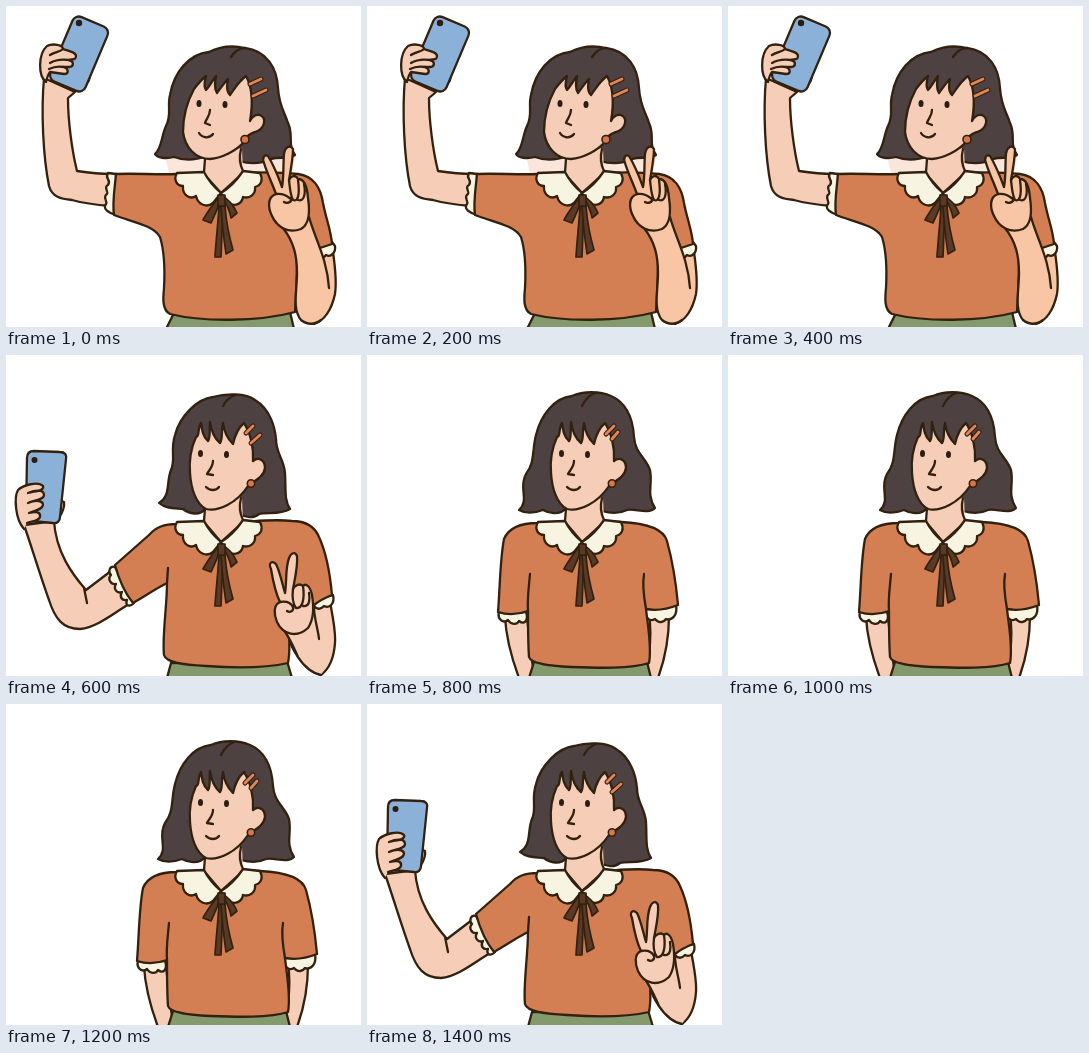
Animation, 355 px wide and 321 px high, one loop 1.6 s. Source, as an HTML page:

```html
<!DOCTYPE html>
<html lang="en">
<head>
<meta charset="utf-8">
<title>Selfie</title>
<style>
  html, body { margin: 0; width: 100%; height: 100%; overflow: hidden; background: #fff; }
  svg { display: block; width: 100vw; height: 100vh; }
  path, rect, circle { fill: none; stroke: #32210f; stroke-width: 2.3; stroke-linejoin: round; stroke-linecap: round; }
  .skin { fill: #f6cdb7; }
  .hand { fill: #f8c6a4; }
  .shirt { fill: #d37f53; }
  .cream { fill: #f7f4e2; }
  .hair { fill: #4e4142; }
  .skirt { fill: #849a6c; }
  .phone { fill: #8cb1d9; }
  .bow { fill: #5a3a26; stroke-width: 1.7; }
  .clip { stroke-width: 5; }
  .clip.in { stroke: #e38656; stroke-width: 2.8; }
  .dot { fill: #2b1d13; stroke: none; }
  .ring { fill: #d87749; stroke-width: 1.6; }
  .pale { fill: #fae6da; }
  .bare { stroke: none; }
</style>
</head>
<body>
<svg viewBox="0 0 355 321" preserveAspectRatio="none">
  <defs>
    <g id="collar">
      <path class="cream" d="M171 167C167 174 171 180 177 180C176 189 184 194 190 190C192 199 201 202 207 197L215 187L222 197C229 201 236 198 237 191C244 193 250 188 249 181C256 179 257 173 254 167L237 165C231 174 223 182 215 187C208 181 202 174 198 166Z"/>
      <path class="bow" d="M213 190C207 199 201 206 197 214L205 217C209 208 213 200 215 192Z"/>
      <path class="bow" d="M216 190C220 197 224 204 225 212L231 207C228 200 222 193 216 190Z"/>
      <path class="bow" d="M213 200C212 218 210 234 209 251L215 251L217 201Z"/>
      <path class="bow" d="M215 200C216 218 218 234 220 248L227 244C223 230 220 214 219 200Z"/>
      <path class="bow" d="M212 189L219 189L219 200L212 200Z"/>
    </g>
    <g id="eyes">
      <ellipse class="dot" cx="194.500" cy="98.500" rx="2.500" ry="3.600"/>
      <ellipse class="dot" cx="220.500" cy="99.500" rx="2.500" ry="3.600"/>
    </g>
    <g id="neck">
      <path class="skin bare" d="M198 146L198 168L215 187L237 167L236 142Z"/>
      <path d="M199 153L198 166M235 143C233 151 234 159 237 165"/>
    </g>
    <g id="face">
      <use href="#neck"/>
      <path class="skin" d="M190 82C185 93 183 106 184 118C185 134 190 149 200 154C212 157 231 148 242 131C248 126 258 122 259 113C259 104 252 102 247 106C248 92 244 77 238 68C232 73 229 80 227 89C222 84 218 76 217 68C215 76 217 84 214 88C208 83 205 74 204 67C203 75 205 82 202 86C197 82 196 75 195 68C191 74 194 82 190 82Z"/>
      <use href="#eyes"/>
      <path d="M207 106C207 112 203 115 201 119L207 120M200 132C204 136 210 136 213 132"/>
      <circle class="ring" cx="245" cy="128.500" r="3.700"/>
    </g>
  </defs>

  <g class="pose">
    <path class="pale bare" d="M159 150L163 167L286 167L290 148Z"/>
    <path class="hair" d="M149 148C156 142 155 131 160 120C166 109 161 100 164 89C168 66 183 48 203 46C213 41 226 39 239 42C261 45 271 62 272 82C273 100 279 107 282 117C288 129 281 138 289 149C284 154 273 150 265 153C255 158 243 158 233 155L200 150C188 155 176 154 168 151C160 153 151 152 149 148Z"/>
    <path d="M225 51C229 45 233 42 239 42"/>
    <use href="#neck"/>
    <path class="skin" d="M188 83C181 96 177 112 177 126C179 142 190 153 204 153C216 152 230 145 238 136C241 129 244 128 249 126C259 123 261 112 254 109C249 108 246 111 244 115C247 98 246 81 240 70C233 75 229 82 224 89C220 85 221 79 222 73C218 77 214 83 211 87C208 82 209 76 210 70C206 75 204 80 200 84C197 80 199 75 200 70C195 74 191 79 188 83Z"/>
    <use href="#eyes" x="-1.500" y="-1"/>
    <path d="M204 104C204 110 200 113 199 117L204 119M193 127C196 132 203 133 207 128"/>
    <path class="clip" d="M244 78L255 73M247 90L260 84"/>
    <path class="clip in" d="M244 78L255 73M247 90L260 84"/>
    <circle class="ring" cx="239" cy="133.500" r="4"/>

    <path class="skin" d="M38 72C35 105 37 150 43 180C46 191 55 193 66 194C80 198 92 199 105 200L106 168C95 168 84 167 71 165C66 145 62 115 62 92L69 86Z"/>
    <path class="skin" d="M72 77C80 82 86 74 82 67L76 65Z"/>
    <rect class="phone" x="-19" y="-35" width="38" height="70" rx="7" transform="translate(73 48) rotate(23)"/>
    <circle class="dot" cx="73" cy="17" r="3.200"/>
    <path class="skin" d="M40 76C32 70 32 48 41 40C47 37 57 39 57 43C62 45 70 46 70 50C70 54 67 53 63 54C68 55 68 60 64 61L58 61C63 63 63 68 58 68L44 66C42 68 41 72 40 76Z"/>
    <path d="M57 43C54 46 48 46 44 49M63 54C56 53 49 54 44 57M58 61C52 60 47 61 43 63"/>
    <path class="cream" d="M110 168L102 167C98 173 106 174 102 179C97 181 103 186 101 188C96 191 102 195 100 198C96 203 103 207 110 209Z"/>

    <path class="skirt" d="M168 307L160 323L288 323L284 306Z"/>
    <path class="hand" d="M312 246L327 246C329 260 331 275 329 288C326 302 319 314 308 318L292 303L292 246Z"/>
    <path class="cream" d="M312 248C315 253 318 252 320 249C325 252 330 246 329 240L326 236L311 241Z"/>
    <path class="shirt" d="M110 168C130 167 151 169 171 168L198 168L215 187L237 167C257 166 275 166 292 168C308 170 315 183 317 197C320 213 325 224 326 238L311 243C302 230 294 222 290 216C292 245 291 276 289 306C252 316 196 316 164 308C156 304 157 292 158 282C159 263 159 247 154 231C147 219 126 216 108 209C106 196 109 181 110 168Z"/>
    <use href="#collar"/>
    <path class="hand bare" d="M277 222C288 236 291 250 291 267C291 285 286 303 295 314C305 322 316 315 321 305L324 283C322 260 310 235 303 211Z"/>
    <path d="M277 222C288 236 291 250 291 267C291 285 286 303 295 314C301 319 309 319 315 314M303 211C309 233 321 252 323 282"/>
    <path class="hand" d="M276 181C272 170 267 158 262 150C258 148 256 152 258 157C261 167 266 177 270 188C261 191 262 202 266 210C271 221 282 228 295 223C304 218 304 205 302 192C301 179 297 173 292 173C289 168 285 170 283 174C285 163 287 152 287 143C284 138 279 141 278 148C277 160 278 171 276 181Z"/>
    <path d="M270 188C277 187 281 190 285 193C286 196 281 198 278 196M283 174C284 182 284 188 287 194C292 196 294 189 292 174M292 194C298 196 300 188 298 178"/>
  </g>

  <g class="pose">
    <path class="hair" d="M153 148C165 141 160 127 165 115C170 105 164 95 169 80C174 61 191 44 207 42C220 38 240 38 249 45C264 54 269 72 270 84C270 99 278 104 279 118C280 134 278 145 284 154C274 160 262 157 253 159C247 164 241 162 235 160L199 154C194 161 183 159 177 154C169 153 160 154 153 148Z"/>
    <path d="M217 51C220 45 224 42 229 40"/>
    <use href="#face"/>
    <path class="clip" d="M240 78L247 71M245 88L254 80"/>
    <path class="clip in" d="M240 78L247 71M245 88L254 80"/>

    <path class="skin" d="M18 170C26 193 34 220 43 245C49 264 57 274 74 274C91 272 105 260 123 249L105 216L80 235C66 219 50 197 48 166Z"/>
    <path d="M78 233L81 248"/>
    <path class="skin" d="M48 167C54 163 59 154 58 147L53 145Z"/>
    <path class="phone" d="M28 96L54 97C59 97 61 100 60 104L54 162C54 166 51 169 47 168L25 166C21 166 19 163 20 159L21 103C21 98 24 96 28 96Z"/>
    <circle class="dot" cx="28.500" cy="105" r="3"/>
    <path class="skin" d="M18 174C9 164 8 142 12 135C17 130 32 126 37 131C39 136 29 136 22 138C29 135 38 134 38 140C38 145 28 145 22 148C29 145 37 145 37 150C36 155 29 155 23 158C30 156 35 157 34 162C32 167 25 166 21 168"/>
    <path class="cream" d="M109 212C103 210 102 218 105 220C101 224 105 230 110 229C107 234 111 239 116 237C113 242 116 246 121 245C119 250 123 253 128 248Z"/>

    <path class="skirt" d="M165 308L161 323L286 323L281 306Z"/>
    <path class="skin" d="M308 244L324 246C326 260 330 275 329 288C328 302 323 314 315 320C301 317 289 300 284 287L285 250Z"/>
    <path class="cream" d="M308 251C312 256 316 253 318 251C324 254 329 248 327 240L306 244Z"/>
    <path class="shirt" d="M171 169C158 169 150 172 143 180L109 210C113 225 119 238 127 248C139 241 151 233 161 228C161 251 156 282 158 300C160 308 180 310 200 311C227 313 260 313 282 308C285 293 283 275 281 259L308 250C313 246 321 242 326 240C324 218 319 195 313 182C308 170 297 166 286 166C269 164 253 166 237 167L215 187L198 167Z"/>
    <path d="M161 228L162 213"/>
    <use href="#collar"/>
    <path class="skin bare" d="M276 272C285 285 287 291 292 302C299 313 308 319 315 320L322 308L318 284C313 270 309 257 306 245Z"/>
    <path d="M276 272C285 285 287 291 292 302C299 313 308 319 315 320M308 252C308 263 312 274 313 284"/>
    <path class="skin" d="M279 238C276 228 274 217 270 209C266 205 262 208 265 214C267 226 269 237 274 247C267 250 268 260 271 267C277 280 291 283 302 273C308 264 308 252 306 240C304 231 300 228 297 231C294 228 289 230 287 234C289 223 292 211 291 201C289 196 285 198 283 203C279 214 281 227 279 238Z"/>
    <path d="M274 247C280 246 285 248 287 252C288 256 284 258 281 256M287 234C286 242 287 249 290 253C296 254 299 245 297 231M297 251C304 252 304 244 303 238"/>
  </g>

  <g class="pose">
    <path class="hair" d="M152 155C163 145 151 133 159 119C168 108 165 95 169 80C174 60 187 43 205 41C216 36 233 36 244 41C260 48 266 65 267 82C268 98 279 103 283 115C286 130 279 139 288 153C281 160 268 153 260 155C252 159 242 158 235 156L199 153C193 161 181 158 176 155C168 158 159 159 152 155Z"/>
    <path d="M215 51C218 45 222 40 228 38"/>
    <use href="#face"/>
    <path class="clip" d="M239 79L247 71M245 84L251 77"/>
    <path class="clip in" d="M239 79L247 71M245 84L251 77"/>

    <path class="skin" d="M138 262C139 282 145 304 152 323L168 323L164 300L160 262Z"/>
    <path class="skin" d="M282 260C285 278 283 299 278 323L291 323C298 304 302 283 302 260Z"/>
    <path class="skirt" d="M167 307L162 323L284 323L280 307Z"/>
    <path class="cream" d="M132 257C130 264 136 269 141 265C144 270 150 270 152 266C157 270 162 266 159 257Z"/>
    <path class="cream" d="M279 254C277 263 283 267 288 264C292 269 297 267 299 264C305 266 311 260 309 250Z"/>
    <path class="shirt" d="M171 168C156 168 142 172 137 184C133 204 133 233 131 257C140 260 150 260 161 256C161 275 161 288 162 302C164 309 185 311 204 312C231 313 264 314 282 308C285 293 281 272 279 254C290 256 301 254 311 250C309 228 305 204 300 186C296 172 276 168 254 167L237 167L215 187L198 167Z"/>
    <path d="M161 256C160 243 162 231 163 219M279 254C277 243 275 231 277 219"/>
    <use href="#collar"/>
  </g>
</svg>
<script>
  const poses = document.querySelectorAll(".pose");
  const order = [0, 0, 0, 1, 2, 2, 2, 1]; // one pose per 200 ms
  const start = performance.now();

  function draw() {
    const step = Math.floor((performance.now() - start) % 1600 / 200);
    poses.forEach((pose, i) => pose.style.display = i === order[step] ? "" : "none");
    requestAnimationFrame(draw);
  }
  draw();
</script>
</body>
</html>
```
